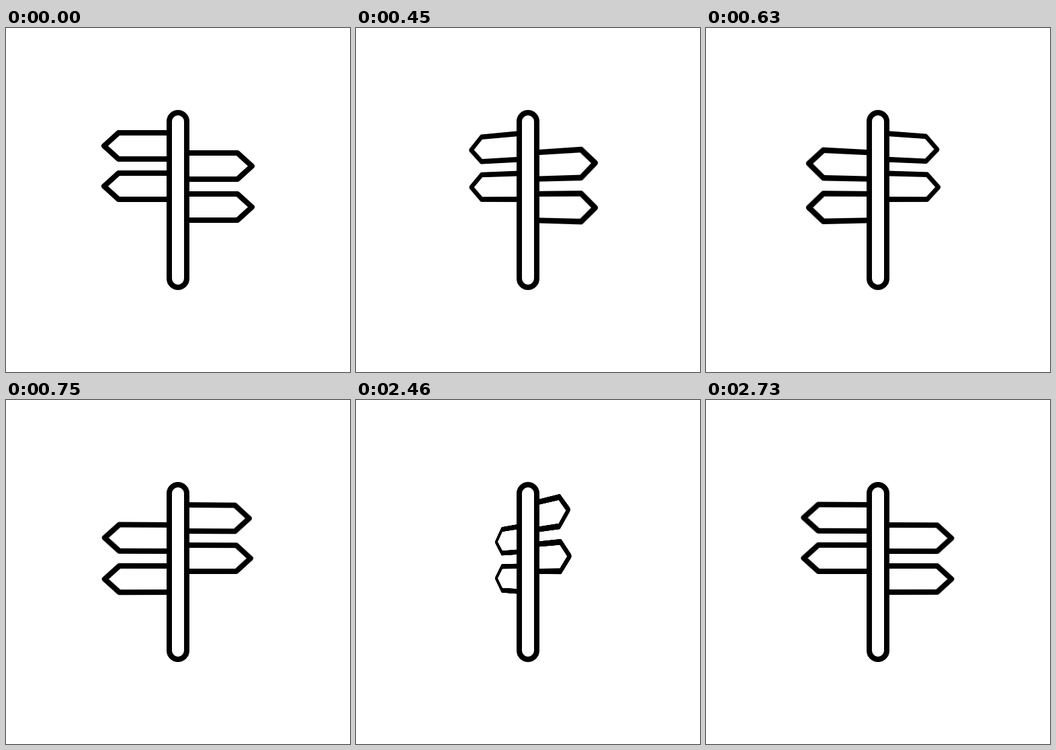
Recreate the animation shown at these times as an HTML page. Size 512 by 512 pixels, loop 3600 ms.

```html
<!DOCTYPE html>
<html lang="en">
<head>
<meta charset="utf-8">
<title>Signpost</title>
<style>
  html, body { margin: 0; width: 100%; height: 100%; overflow: hidden; background: #fff; }

  .stage {
    position: relative;
    width: 512px;
    height: 512px;
    overflow: hidden;
    perspective: 728px;
    perspective-origin: 256px 256px;
  }

  svg {
    position: absolute;
    inset: 0;
    width: 512px;
    height: 512px;
    fill: none;
    stroke: #000;
    stroke-width: 8;
    stroke-linejoin: round;
  }

  .sign {
    transform-origin: var(--pivot) 256px;
    animation: turn 3600ms cubic-bezier(.65, 0, .35, 1) infinite;
  }

  .post { fill: #fff; }

  /* two half turns: 234-834 ms and 2198-2798 ms */
  @keyframes turn {
    0%, 6.5% { transform: rotateY(0deg); }
    23.167%, 61.056% { transform: rotateY(-180deg); }
    77.722%, 100% { transform: rotateY(-360deg); }
  }
</style>
</head>
<body>
<div class="stage">
  <svg class="sign" style="--pivot: 254.5px" viewBox="0 0 512 512"><path d="M256 156H167.5L146 175.5L167.5 195H256"/></svg>
  <svg class="sign" style="--pivot: 255.5px" viewBox="0 0 512 512"><path d="M256 216H167.5L146 235.5L167.5 255H256"/></svg>
  <svg class="sign" style="--pivot: 256.8px" viewBox="0 0 512 512"><path d="M256 186H344.5L366 205.5L344.5 225H256"/></svg>
  <svg class="sign" style="--pivot: 256.8px" viewBox="0 0 512 512"><path d="M256 247H344.5L366 266.5L344.5 286H256"/></svg>
  <svg class="post" viewBox="0 0 512 512"><rect x="243" y="126" width="26" height="260" rx="13"/></svg>
</div>
</body>
</html>
```
